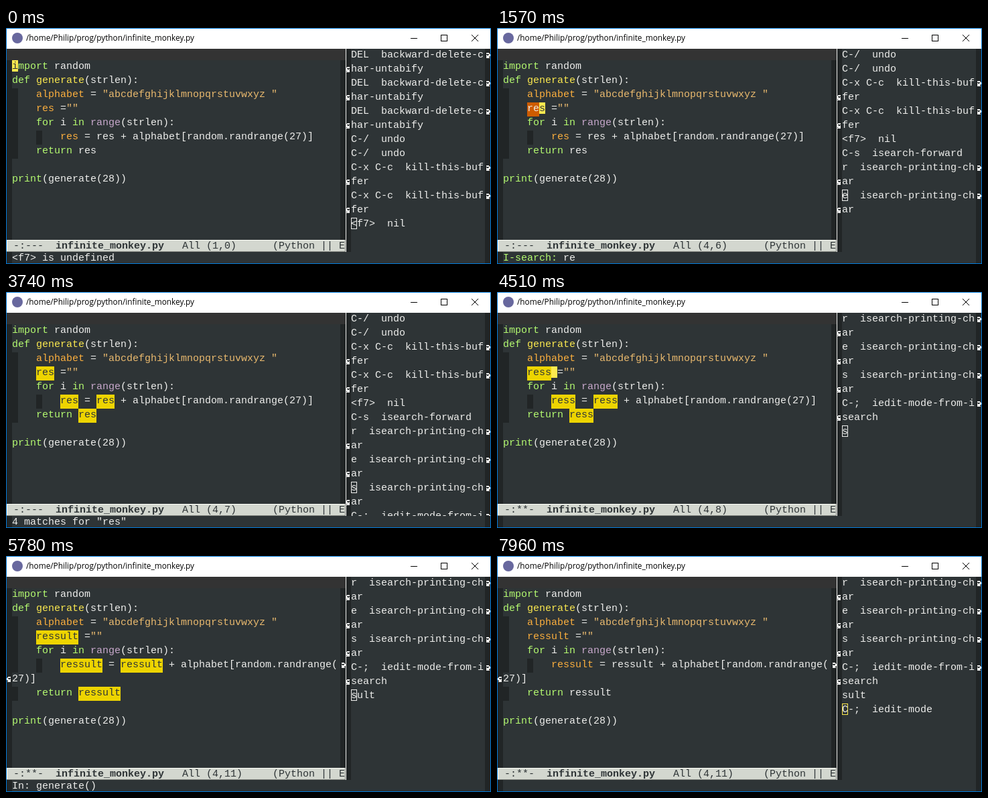
Write an HTML page that moves like this. It is 724 px wide and 352 px high and loops after 8000 ms.

```html
<!DOCTYPE html>
<html lang="en">
<head>
<meta charset="utf-8">
<title>Editor session</title>
<style>
html, body { margin: 0; width: 100%; height: 100%; overflow: hidden; background: #2e3436; }
svg { display: block; }
text { white-space: pre; font: 15px "Liberation Mono", "Courier New", monospace; }
.title { font: 11.8px "Open Sans", "Segoe UI", sans-serif; }
.bold { font-weight: bold; }
rect, .crisp { shape-rendering: crispEdges; }
</style>
</head>
<body>
<svg id="stage" width="724" height="352" viewBox="0 0 724 352">
  <defs>
    <path id="curl" class="crisp" fill="#eeeeec" d="M2 0h4v2h-4v1h1v1h2v-1h1v5h-5v-1h1v-1h-1v-1h-1v-3h1v-1h1z"/>
    <clipPath id="codeClip"><rect x="1" y="31" width="506" height="285"/></clipPath>
    <clipPath id="barClip"><rect x="1" y="316" width="506" height="18"/></clipPath>
    <clipPath id="logClip"><rect x="507" y="31" width="216" height="303"/></clipPath>
  </defs>
  <rect width="724" height="352" fill="#0078d7"/>
  <rect x="1" y="1" width="722" height="30" fill="#fff"/>
  <circle cx="17" cy="15" r="8" fill="#68689e"/>
  <text class="title" x="30" y="19" fill="#000">/home/Philip/prog/python/infinite_monkey.py</text>
  <g fill="none" stroke="#000">
    <path class="crisp" d="M604 15.5h10M649.5 10.5h9v9h-9z"/>
    <path d="M695 10l10 10M705 10l-10 10"/>
  </g>
  <rect x="1" y="31" width="722" height="320" fill="#212526"/>
  <rect x="1" y="31" width="506" height="17" fill="#333333"/>
  <rect x="9" y="48" width="490" height="268" fill="#2e3436"/>
  <rect x="515" y="31" width="200" height="303" fill="#2e3436"/>
  <rect x="9" y="334" width="706" height="17" fill="#2e3436"/>
  <rect x="507" y="31" width="1" height="303" fill="#eeeeec"/>
  <rect x="1" y="316" width="506" height="18" fill="#d3d7cf"/>
  <path class="crisp" fill="none" stroke="#fdfff8" d="M1.5 334v-17.5h505.5"/>
  <path class="crisp" fill="none" stroke="#7e817c" d="M1 333.5h505.5v-17.5"/>
  <g id="code" clip-path="url(#codeClip)"></g>
  <g id="bar" clip-path="url(#barClip)"></g>
  <g id="log" clip-path="url(#logClip)"></g>
  <g id="echo"></g>
</svg>
<script>
const LOOP = 8000, CHAR = 9, ROW = 21, BASE = 13, CODE_COLS = 54, LOG_COLS = 22;
const C = {
  text: '#eeeeec', dark: '#2e3436', guide: '#212526', key: '#b4fa70', fn: '#fce94f',
  name: '#fcaf3e', str: '#e9b96e', builtin: '#c8a8cc', cursor: '#fce94f',
  match: '#ce5c00', lazy: '#8f5902', edit: '#edd400'
};

// Each step overrides the values of the ones before it.
const steps = [
  { at: 0, word: 'res', line: 0, col: 0, echo: '<f7> is undefined',
    entries: 8, top: 0, focus: 12, frame: 'text' },
  { at: 470, prompt: 'I-search: ', echo: '', entries: 9, focus: 13 },
  { at: 1400, echo: 'r', match: [0, 4, 1], col: 5, focus: -1 },
  { at: 1570, echo: 're', match: [3, 4, 2], line: 3, col: 6, entries: 11, top: 6, focus: 16 },
  { at: 1870, echo: 'res', match: [3, 4, 3], col: 7, entries: 12, focus: 18, frame: 'cursor' },
  { at: 2190, hits: 'lazy' },
  { at: 3260, prompt: '', echo: '4 matches for "res"', match: null, hits: 'edit',
    entries: 13, frame: 'text' },
  { at: 4510, word: 'ress', col: 8, echo: '', entries: 14, top: 14, focus: 22 },
  { at: 4840, echo: 'In: generate()' },
  { at: 4990, word: 'ressu', col: 9 },
  { at: 5310, word: 'ressul', col: 10 },
  { at: 5460, word: 'ressult', col: 11 },
  { at: 6410, hits: '', echo: '', entries: 15, focus: 23, frame: 'cursor' }
];

// Spans in which the blinking cursor is hidden.
const hidden = [[320, 470], [1100, 1400], [2500, 2960], [3740, 3910], [4360, 4510],
  [4840, 4990], [5780, 6410], [6870, 7500], [7960, 8000]];

const codeLines = word => [
  [['import', 'key'], [' random']],
  [['def', 'key'], [' '], ['generate', 'fn'], ['(strlen):']],
  [['    '], ['alphabet', 'name'], [' = '], ['"abcdefghijklmnopqrstuvwxyz "', 'str']],
  [['    '], [word, 'name', true], [' ='], ['""', 'str']],
  [['    '], ['for', 'key'], [' i '], ['in', 'key'], [' '], ['range', 'builtin'], ['(strlen):']],
  [['        '], [word, 'name', true], [' = '], [word, 'text', true],
    [' + alphabet[random.randrange(27)]']],
  [['    '], ['return', 'key'], [' '], [word, 'text', true]],
  [],
  [['print', 'key'], ['(generate(28))']]
];

const logEntries = word => {
  const twice = s => [s, s];
  const typed = c => c + '  isearch-printing-char';
  const del = 'DEL  backward-delete-char-untabify';
  return [del, ...twice(del), ...twice('C-/  undo'), ...twice('C-x C-c  kill-this-buffer'),
    '<f7>  nil', 'C-s  isearch-forward', typed('r'), typed('e'), typed('s'),
    'C-;  iedit-mode-from-isearch', word.slice(3), 'C-;  iedit-mode'];
};

const escapeText = s => s.replace(/&/g, '&amp;').replace(/</g, '&lt;');
const label = (x, y, s, fill, cls = '') =>
  s.trim() ? `<text class="${cls}" x="${x}" y="${y}" fill="${fill}">${escapeText(s)}</text>` : '';
const box = (x, y, w, h, fill) =>
  `<rect x="${x}" y="${y}" width="${w}" height="${h}" fill="${fill}"/>`;
const curlLeft = (x, y) => `<use href="#curl" transform="translate(${x} ${y + 6})"/>`;
const curlRight = (x, y) => `<use href="#curl" transform="translate(${x} ${y + 6}) scale(-1 1)"/>`;

function chunks(list, size) {
  const out = [];
  for (let i = 0; i === 0 || i < list.length; i += size) out.push(list.slice(i, i + size));
  return out;
}

function lineCells(tokens, lineNo, s) {
  const cells = [];
  for (const [str, kind = 'text', hit] of tokens) {
    for (const ch of str) {
      const col = cells.length, m = s.match;
      const cell = { ch, fg: C[kind], bg: '' };
      if (m && m[0] === lineNo && col >= m[1] && col < m[1] + m[2]) {
        cell.fg = C.text;
        cell.bg = C.match;
      } else if (hit && s.hits) {
        cell.bg = C[s.hits];
        if (s.hits === 'edit') cell.fg = C.dark;
      }
      cells.push(cell);
    }
  }
  return cells;
}

function drawRuns(cells, y) {
  let back = '', front = '';
  for (let i = 0, j; i < cells.length; i = j) {
    const { fg, bg } = cells[i];
    for (j = i; j < cells.length && cells[j].fg === fg && cells[j].bg === bg;) j++;
    const x = 9 + i * CHAR;
    if (bg) back += box(x, y, (j - i) * CHAR, ROW, bg);
    const run = cells.slice(i, j).map(c => c.ch).join('');
    const lead = run.length - run.trimStart().length;
    front += label(x + lead * CHAR, y + BASE, run.trimStart(), fg);
  }
  return back + front;
}

function drawCode(s, cursorOn) {
  let y = 48, out = '';
  codeLines(s.word).forEach((tokens, n) => {
    const cells = lineCells(tokens, n, s);
    const indent = cells.findIndex(c => c.ch !== ' ');
    for (let col = 0; col < indent; col += 4) out += box(9 + col * CHAR, y, CHAR, ROW, C.guide);
    if (cursorOn && n === s.line) {
      Object.assign(cells[s.col], { fg: C.dark, bg: '' });
      out += box(9 + s.col * CHAR, y, CHAR, 17, C.cursor);
    }
    const rows = chunks(cells, CODE_COLS);
    rows.forEach((row, i) => {
      out += drawRuns(row, y);
      if (i > 0) out += curlLeft(1, y);
      if (i < rows.length - 1) out += curlRight(507, y);
      y += ROW;
    });
  });
  return out;
}

function drawLog(s) {
  let row = -s.top, out = '';
  for (const entry of logEntries(s.word).slice(0, s.entries)) {
    const parts = chunks(entry, LOG_COLS);
    parts.forEach((part, i) => {
      const y = 31 + row++ * ROW;
      if (y < 31 || y > 334) return;
      out += label(515, y + BASE, part, C.text);
      if (i > 0) out += curlLeft(507, y);
      if (i < parts.length - 1) out += curlRight(723, y);
    });
  }
  if (s.focus >= 0) {
    const y = 31 + (s.focus - s.top) * ROW;
    out += `<rect x="515.5" y="${y + 0.5}" width="8" height="16" fill="none" stroke="${C[s.frame]}"/>`;
  }
  return out;
}

function drawBar(s) {
  const at = (col, str, cls) => label(2 + col * CHAR, 329, str, C.dark, cls);
  return at(1, s.word === 'res' ? '-:---' : '-:**-') + at(8, 'infinite_monkey.py', 'bold') +
    at(29, `All (${s.line + 1},${s.col})`) + at(44, '(Python || E');
}

function drawEcho(s) {
  const prompt = s.prompt || '';
  return label(9, 347, prompt, C.key) + label(9 + prompt.length * CHAR, 347, s.echo, C.text);
}

const part = id => document.getElementById(id);
let shown = '';

function render(t) {
  const past = steps.filter(step => step.at <= t);
  const cursorOn = !hidden.some(([from, to]) => t >= from && t < to);
  const key = past.length + '/' + cursorOn;
  if (key === shown) return;
  shown = key;
  const state = Object.assign({}, ...past);
  part('code').innerHTML = drawCode(state, cursorOn);
  part('bar').innerHTML = drawBar(state);
  part('log').innerHTML = drawLog(state);
  part('echo').innerHTML = drawEcho(state);
}

const start = performance.now();
function tick() {
  render((performance.now() - start) % LOOP);
  requestAnimationFrame(tick);
}
tick();
</script>
</body>
</html>
```
